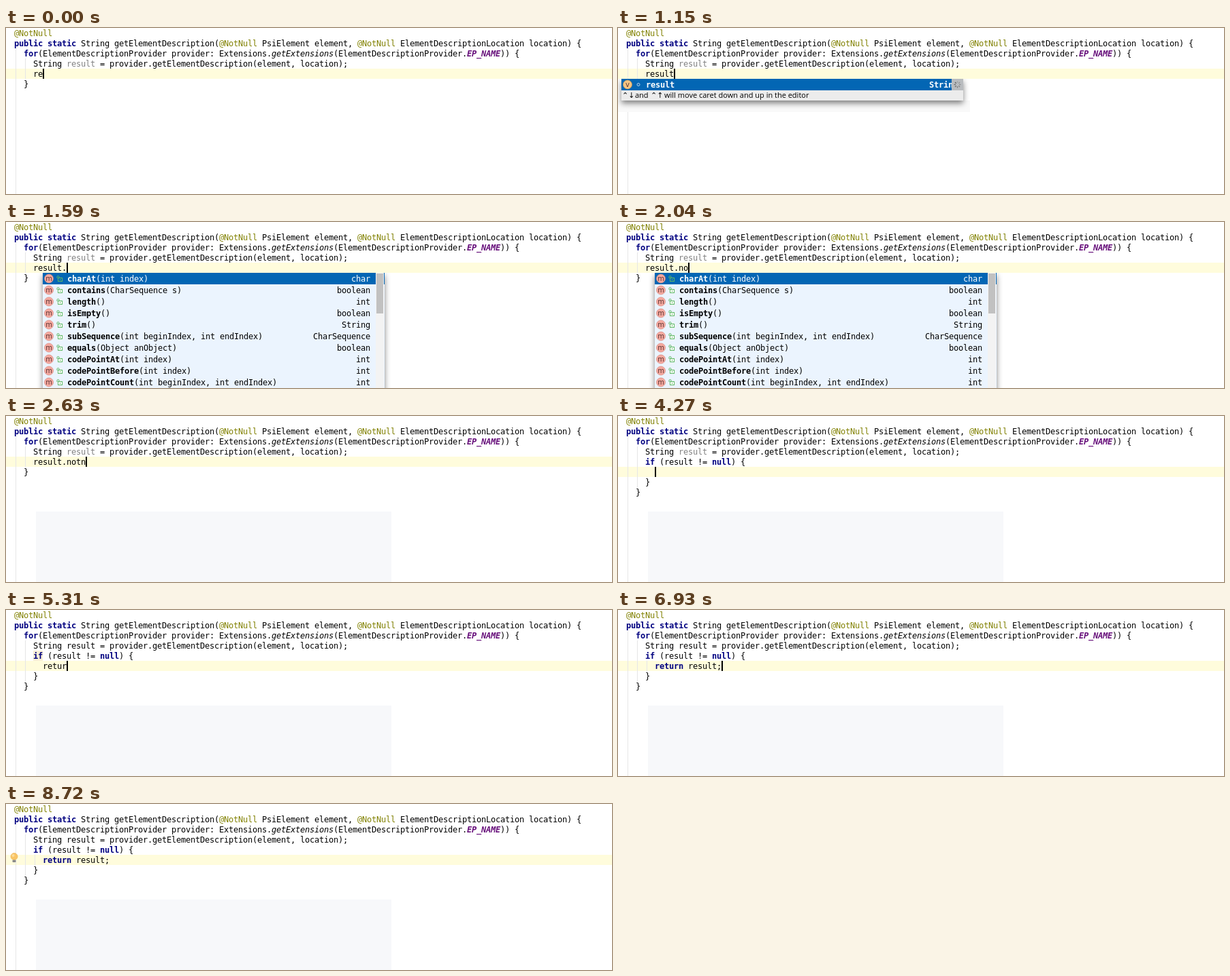
Recreate the animation shown at these times as an HTML page. Size 890 by 245 pixels, loop 9000 ms.

```html
<!DOCTYPE html>
<html lang="en">
<head>
<meta charset="utf-8">
<title>Postfix completion</title>
<style>
html, body { margin: 0; width: 100%; height: 100%; overflow: hidden; background: #fff; }
svg { display: block; }
text { white-space: pre; font: 12px "DejaVu Sans Mono", monospace; fill: #000; }
.k { font-weight: bold; fill: #000080; }
.a { fill: #808000; }
.u { fill: #808080; }
.i { font-style: italic; }
.c { font-weight: bold; font-style: italic; fill: #660e7a; }
.b { font-weight: bold; }
.w { fill: #fff; }
.s { font-weight: bold; fill: #fff; }
.hint { font: 11px "Open Sans", sans-serif; }
.arrow { font: 11px "DejaVu Sans", sans-serif; }
.icon { font: 10px "DejaVu Sans", sans-serif; text-anchor: middle; fill: #5c3535; }
</style>
</head>
<body>
<svg id="stage" width="890" height="245" viewBox="0 0 890 245">
  <defs>
    <filter id="shadow" x="-10%" y="-60%" width="120%" height="250%">
      <feDropShadow dx="0" dy="4" stdDeviation="4" flood-opacity=".5"/>
    </filter>
  </defs>
  <g id="view"></g>
</svg>
<script>
const LOOP = 9000, CELL = 7, LINE = 15, ROW = 17;
const BLUE = '#0366b4';
const view = document.getElementById('view');

const rect = (x, y, w, h, fill, extra = '') =>
  `<rect x="${x}" y="${y}" width="${w}" height="${h}" fill="${fill}" ${extra}/>`;
const path = (d, stroke, width = 1) =>
  `<path d="${d}" fill="none" stroke="${stroke}" stroke-width="${width}"/>`;
const label = (x, y, str, cls) => `<text x="${x}" y="${y}" class="${cls}">${str}</text>`;

// Monospaced run on a fixed cell grid; parts are [text, class] pairs.
function run(x, y, ...parts) {
  let out = '';
  for (const [str, cls = ''] of parts) {
    const xs = [...str].map((_, i) => x + i * CELL);
    out += `<text x="${xs.join(' ')}" y="${y}" class="${cls}">${str}</text>`;
    x += xs.length * CELL;
  }
  return out;
}
const code = (line, indent, ...parts) =>
  run(12 + indent * 14, line * LINE + 12, ...parts);
const guide = (x, top, bottom) => rect(x, top, 1, bottom - top, '#e6e6e6');
const caret = (x, line) => rect(x, line * LINE, 2, LINE, '#000');

const HEAD =
  code(0, 0, ['@NotNull', 'a']) +
  code(1, 0, ['public static', 'k'], [' String getElementDescription('], ['@NotNull', 'a'],
    [' PsiElement element, '], ['@NotNull', 'a'], [' ElementDescriptionLocation location) {']) +
  code(2, 1, ['for', 'k'], ['(ElementDescriptionProvider provider: Extensions.'],
    ['getExtensions', 'i'], ['(ElementDescriptionProvider.'], ['EP_NAME', 'c'], [')) {']);

function bulb(x, y) {
  return `<circle cx="${x}" cy="${y}" r="5" fill="#f9c566" stroke="#eeb04c" stroke-width=".7"/>` +
    `<circle cx="${x - 1.5}" cy="${y - 1.5}" r="2" fill="#fcdc9a"/>` +
    rect(x - 2.5, y + 5, 5, 3.5, '#8a8a8a', 'rx="1"');
}

function frame(x, w, h, fill) {
  return rect(x - 10, 75 + h, w + 20, 17, '#f9f9f9') +
    rect(x, 75, w, h, fill, 'filter="url(#shadow)"') +
    rect(x, 75, w, ROW, BLUE);
}

function hint(x, y) {
  return label(x + 1, y + 11, '⌃↓', 'arrow') + label(x + 20, y + 11, 'and', 'hint') +
    label(x + 43, y + 11, '⌃↑', 'arrow') +
    label(x + 63, y + 11, 'will move caret down and up in the editor', 'hint');
}

function variablePopup(loading) {
  let out = frame(5, 502, 32, '#ececec') + hint(5, 92) +
    `<circle cx="14" cy="83.5" r="6.5" fill="#f6c583" stroke="#d99a4e" stroke-width=".7"/>` +
    label(14, 87, 'v', 'icon') +
    `<circle cx="30" cy="83.5" r="2" fill="none" stroke="#b9d3ea"/>` +
    run(41, 88, ['result', 's']) + run(457, 88, ['String', 's']);
  if (loading) {
    out += rect(490, 75, 17, ROW, '#b9bcbf');
    for (let i = 0; i < 8; i++) {
      out += `<path d="M498.500 81V78.500" stroke="#555" stroke-opacity="${.25 + i * .09}"
        stroke-width="1.300" transform="rotate(${i * 45} 498.500 83.500)"/>`;
    }
  }
  return out;
}

function methodRow(i, name, args, type) {
  const y = 75 + i * ROW, on = i === 0;
  return `<circle cx="63" cy="${y + 8.5}" r="6.500" fill="#f5a99f" stroke="#d98a82" stroke-width=".7"/>` +
    label(63, y + 12, 'm', 'icon') +
    path(`M75 ${y + 8}v-2a1.500 1.500 0 0 1 3 0v2`, '#5fb865') +
    rect(76.5, y + 7.5, 6, 5, on ? BLUE : '#fff', 'stroke="#5fb865"') +
    rect(79, y + 9, 1, 2, '#5fb865') +
    run(90, y + 13, [name, on ? 's' : 'b'], [args, on ? 'w' : '']) +
    run(535 - type.length * CELL, y + 13, [type, on ? 'w' : '']);
}

const METHODS = [
  ['charAt', '(int index)', 'char'],
  ['contains', '(CharSequence s)', 'boolean'],
  ['length', '()', 'int'],
  ['isEmpty', '()', 'boolean'],
  ['trim', '()', 'String'],
  ['subSequence', '(int beginIndex, int endIndex)', 'CharSequence'],
  ['equals', '(Object anObject)', 'boolean'],
  ['codePointAt', '(int index)', 'int'],
  ['codePointBefore', '(int index)', 'int'],
  ['codePointCount', '(int beginIndex, int endIndex)', 'int']
];
const rows = list => list.map((m, i) => methodRow(i, ...m)).join('');

const methodPopup = () => frame(54, 502, 190, '#ebf4fe') + rows(METHODS) +
  rect(543, 75, 12, 170, '#f3f3f3') + rect(544, 76, 10, 59, '#c1c1c1');

const notifyPopup = () => frame(54, 495, 49, '#ebf4fe') +
  rect(54, 109, 495, 15, '#ececec') + hint(54, 109) +
  rows([['notify', '()', 'void'], ['notifyAll', '()', 'void']]);

const templatePopup = lit => frame(75, 301, 32, '#ececec') + hint(75, 92) +
  run(83, 88, ['notnull → if (expr != null)', 's']) +
  run(343, 88, ['[⇥]', 's']) + (lit ? bulb(366, 83) : '');

// Latest entry whose start time has passed.
const at = (steps, t) => steps.reduce((cur, s) => t >= s[0] ? s[1] : cur, '');

const FIRST = [
  [0, 're'], [300, 'res'], [440, 'resu'], [570, 'resul'], [710, 'result'],
  [1440, 'result.'], [1890, 'result.n'], [2030, 'result.no'], [2180, 'result.not'],
  [2630, 'result.notn'], [2920, 'result.notnul'], [3220, 'result.notnull']
];
const SECOND = [
  [4870, 'r'], [5020, 're'], [5160, 'retu'], [5310, 'retur'], [5460, 'return'],
  [5600, 'return '], [5740, 'return r'], [5890, 'return re'], [6040, 'return res'],
  [6190, 'return resu'], [6340, 'return result'], [6630, 'return result;']
];
const POPUPS = [
  [1150, 'loading'], [1300, 'variable'], [1440, ''], [1590, 'methods'], [2330, 'notify'],
  [2630, ''], [3220, 'template'], [3820, 'lit'], [4270, '']
];
const DRAW = {
  loading: () => variablePopup(true),
  variable: () => variablePopup(false),
  methods: methodPopup,
  notify: notifyPopup,
  template: () => templatePopup(false),
  lit: () => templatePopup(true)
};
const CARET = [[0, 'on'], [3970, ''], [4270, 'on'], [7820, ''], [8270, 'on'], [8720, '']];

function render(t) {
  const expanded = t >= 4270, line = expanded ? 5 : 4;
  const typed = at(expanded ? SECOND : FIRST, t);
  const start = expanded ? 54 : 40;
  const checked = t >= 4570, settled = t >= 6930;
  const popup = at(POPUPS, t);

  let out = t >= 2330 ? rect(44, 141, 522, 104, '#f7f8fa') : '';
  out += rect(0, line * LINE, 890, LINE, '#fffcdc');
  if (checked && !settled) out += rect(40, 60, 14, LINE, '#faf0d6');
  out += guide(14, 30, 245) + guide(28, 45, expanded ? 105 : 75);
  if (settled) out += guide(42, 75, 90);
  out += HEAD + code(3, 2, ['String '], ['result', checked ? '' : 'u'],
    [' = provider.getElementDescription(element, location);']);

  if (expanded) {
    const key = typed.startsWith('return') ? 'return' : '';
    out += code(4, 2, ['if', 'k'], [' (result != '], ['null', 'k'], [') {']) +
      code(5, 3, [key, 'k'], [typed.slice(key.length)]) +
      code(6, 2, ['}']) + code(7, 1, ['}']);
  } else {
    out += code(4, 2, [typed]) + code(5, 1, ['}']);
  }
  if (popup) {
    // Keep the popup's shadow off the lines above it.
    out += `<svg y="75" width="890" height="170" viewBox="0 75 890 170">${DRAW[popup]()}</svg>`;
  }
  if (at(CARET, t)) out += caret(start + typed.length * CELL, line);
  if (t >= 7530) out += bulb(12, 77.5);
  return out;
}

let shown = '';
function tick(now) {
  const next = render(now % LOOP);
  if (next !== shown) view.innerHTML = shown = next;
  requestAnimationFrame(tick);
}
tick(performance.now());
</script>
</body>
</html>
```
